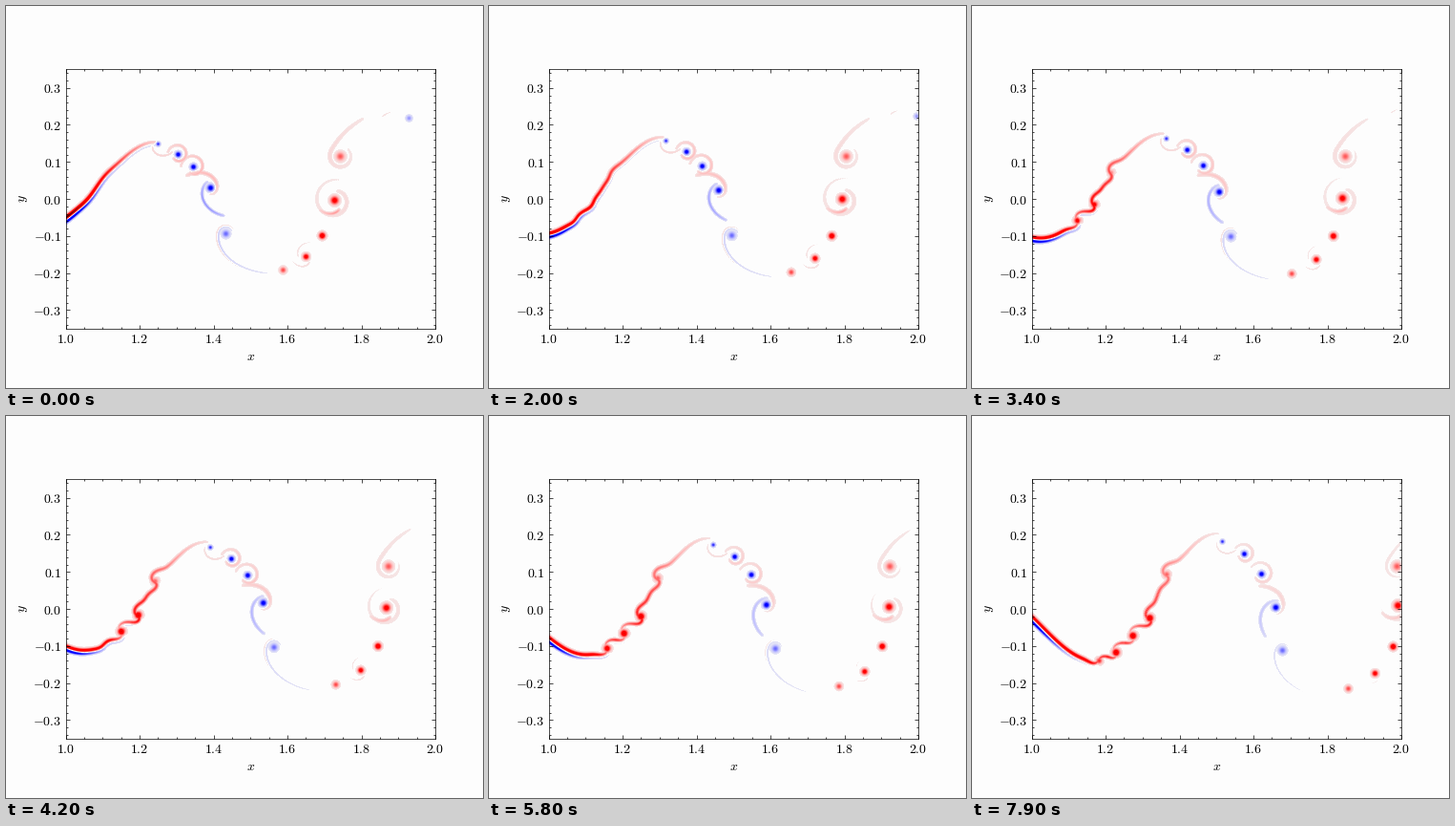
A matplotlib script for the animation above (8 s loop, 500 by 400 pixels).

```python
import numpy as np
import matplotlib.pyplot as plt
from matplotlib.animation import FuncAnimation
from matplotlib.ticker import AutoMinorLocator, MultipleLocator

FRAMES, STEP, END = 80, 0.1, 7.9
W, H, PAD = 387, 271, 24
LEFT, TOP = 63, 67
PAPER = "#fdfdfd"

plt.rcParams.update({"mathtext.fontset": "cm", "font.size": 10, "axes.linewidth": 0.5,
                     "xtick.top": True, "ytick.right": True})
for side in ("xtick", "ytick"):
    plt.rcParams.update({f"{side}.direction": "in", f"{side}.major.pad": 3,
                         f"{side}.major.size": 3, f"{side}.minor.size": 1.5,
                         f"{side}.major.width": 0.5, f"{side}.minor.width": 0.5})

# Free vortices: start, end, spread, strength (negative is blue)
VORTICES = {
    "b1": ((159, 144), (262, 131), 1.5, -0.85),
    "b2": ((180, 155), (285, 144), 2.0, -1.2),
    "b3": ((196, 168), (303, 165), 2.1, -1.2),
    "b4": ((214, 190), (318, 200), 2.5, -1.15),
    "b5": ((230, 238), (325, 245), 2.7, -0.62),
    "b6": ((422, 117), (525, 109), 2.1, -0.45),
    "r1": ((290, 276), (394, 285), 2.3, 0.75),
    "r2": ((314, 262), (422, 269), 2.3, 1.2),
    "r3": ((331, 240), (441, 241), 2.4, 1.4),
    "r4": ((344, 203), (446, 198), 3.0, 1.2),
    "r5": ((350, 157), (445, 157), 3.2, 0.68),
}

# Spiral arms: vortex, angles, radii, flare, total turn, strength, width
ARMS = [
    ("b1", 200, 30, 5, 17, 1.5, 0, 0.16, 0.8),
    ("b2", 195, 500, 11, 6, 1, 20, 0.32, 1.1),
    ("b3", 185, 480, 13, 7, 1, 30, 0.32, 1.1),
    ("b4", 450, 208, 6, 28, 4, 25, 0.30, 1.4),
    ("b4", 240, 65, 7, 32, 3, 45, -0.45, 1.0),
    ("b5", 330, 44, 7, 60, 7, 10, -0.20, 0.9),
    ("b5", 330, 44, 9, 61, 7, 10, 0.13, 0.8),
    ("r2", 310, 180, 17, 8, 1, 0, 0.08, 0.8),
    ("r2", 165, 60, 15, 7, 1, 0, 0.10, 0.9),
    ("r4", 280, -75, 22, 10, 1, 15, 0.12, 1.8),
    ("r4", 145, 65, 18, 11, 1, 10, 0.42, 1.2),
    ("r5", -40, 301, 11, 46, 14, 0, 0.13, 1.8),
    ("b6", 200, 184, 19, 28, 1, 0, 0.08, 0.8),
]

# Shear layer: every point keeps the time it left the inlet
SPEED, TIP = 12.9, -7.2
ROLLS = -3.0 + 1.37 * np.arange(5)
ONSET = 1.6 + 1.4 * np.abs(np.arange(5) - 2.2)


def mix(a, b, k):
    return a + (b - a) * k


def splat(field, x, y, amp, width, reach=6):
    """Stamp soft dots, keeping the strongest value at each pixel."""
    x, y, amp, width = np.broadcast_arrays(*map(np.atleast_1d, (x, y, amp, width)))
    x, y = x - LEFT + PAD, y - TOP + PAD
    edge = reach + 1
    ok = (x > edge) & (x < W + 2 * PAD - edge - 1) & (y > edge) & (y < H + 2 * PAD - edge - 1)
    x, y, amp, width = (v[ok][:, None, None] for v in (x, y, amp, width))
    d = np.arange(-reach, reach + 1)
    px = np.rint(x).astype(int) + d[None, None, :]
    py = np.rint(y).astype(int) + d[None, :, None]
    val = np.abs(amp) * np.exp(-((px - x)**2 + (py - y)**2) / (2 * width**2))
    px, py = np.broadcast_arrays(px, py)
    np.maximum.at(field, (py.ravel(), px.ravel()), val.ravel())


def layer(born, t):
    """Growing travelling wave that steepens on its rising flank."""
    age = t - born
    swing = 40 + 3 * age - 0.025 * age**2
    u = (born + 2.3) / 1.1
    y = 203 + swing * np.cos(0.306 * (born - 3.5)) + 2 * age * u * np.exp(-u**2)
    return LEFT + SPEED * age, y


def draw_layer(pos, neg, t):
    born = np.linspace(TIP, t + 1, 480)
    x, y = layer(born, t)
    grow = np.clip((t - ROLLS - ONSET) / 2.2, 0, 1)
    thin = np.zeros_like(born)
    for i, (tau, g) in enumerate(zip(ROLLS, grow)):
        if g == 0:
            continue
        cx, cy = layer(tau, t)
        dx, dy = x - cx, y - cy
        a = 1.5 * g * np.exp(-(dx**2 + dy**2) / 80)
        x, y = cx + dx * np.cos(a) + dy * np.sin(a), cy - dx * np.sin(a) + dy * np.cos(a)
        if i > 1:
            thin = np.maximum(thin, g * np.exp(-((born - tau) / 0.75)**2))
        splat(pos, cx, cy, (0.65 if i == 0 else 1.45) * g, 2.0 + 0.7 * g, 9)

    dx, dy = np.gradient(x), np.gradient(y)
    size = np.hypot(dx, dy) + 1e-6
    nx, ny = dy / size, -dx / size
    away = np.clip(x - LEFT, 0, None)
    red = np.clip(1.4 + 0.167 * born, 0.15, 1.2) * np.exp(0.02 * t * np.minimum(born, 0))
    red = red * (1 - 0.72 * thin) + 0.8 * np.exp(-away / 22 - t / 2)
    width = np.clip(1.9 + 0.12 * born, 0.9, 1.5) * (1 - 0.4 * thin)
    splat(pos, x - 1.3 * nx, y - 1.3 * ny, red, width)
    blue = 1.15 * np.exp(-(away / 32)**2) + 0.15 * (1 - 0.08 * t) * np.exp(-away / 150)
    splat(neg, x + 2.3 * nx, y + 2.3 * ny, blue, 0.8 + 0.5 * np.exp(-away / 40))


def draw_street(pos, neg, t):
    k = t / END
    at = {}
    for name, (start, stop, width, amp) in VORTICES.items():
        at[name] = mix(np.array(start, float), np.array(stop, float), k)
        splat(pos if amp > 0 else neg, *at[name], amp, width, 9)

    u = np.linspace(0, 1, 150)
    s = 1 - (1 - u)**2
    for name, a0, a1, r0, r1, flare, turn, amp, width in ARMS:
        a = np.radians(mix(a0, a1, s) + turn * k)
        r = mix(r0, r1, s**flare)
        fade = (1 - 0.5 * k) * (0.45 + 0.55 * np.sin(np.pi * u))
        cx, cy = at[name]
        splat(pos if amp > 0 else neg, cx + r * np.cos(a), cy + r * np.sin(a),
              amp * fade, width * (1 + 0.2 * k))


# Strength to colour; the faintest values stay paper white
LEVELS = [0, 0.045, 0.05, 0.3, 0.6, 1, 1.35, 2.1]
MAIN = [253, 253, 246, 255, 255, 255, 255, 10]
OTHER = [253, 253, 231, 188, 110, 0, 0, 0]


def render(t):
    pos, neg = np.zeros((2, H + 2 * PAD, W + 2 * PAD))
    draw_layer(pos, neg, t)
    draw_street(pos, neg, t)
    v = (pos - neg)[PAD:-PAD, PAD:-PAD]
    main, other = (np.interp(np.abs(v), LEVELS, c) for c in (MAIN, OTHER))
    rgb = [np.where(v > 0, main, other), other, np.where(v > 0, other, main)]
    return np.dstack(rgb).astype(np.uint8)


fig, ax = plt.subplots(figsize=(5, 4), dpi=100, facecolor=PAPER)
ax.set_facecolor("none")
ax.set(xlim=(1, 2), ylim=(-0.35, 0.35))
ax.set_xlabel("$x$", labelpad=3.2)
ax.set_ylabel("$y$", labelpad=2.6)
ax.set_aspect("equal")
for axis, step in ((ax.xaxis, 0.2), (ax.yaxis, 0.1)):
    axis.set_major_locator(MultipleLocator(step))
    axis.set_minor_locator(AutoMinorLocator())
    axis.set_major_formatter(lambda v, _: f"${round(v, 1) + 0.0:.1f}$")
flow = fig.figimage(render(0), LEFT, 400 - TOP - H, origin="upper", zorder=-1)


def update(i):
    flow.set_data(render(i * STEP))
    return [flow]


anim = FuncAnimation(fig, update, frames=FRAMES, interval=100, repeat=True, blit=False)
plt.show()
```
